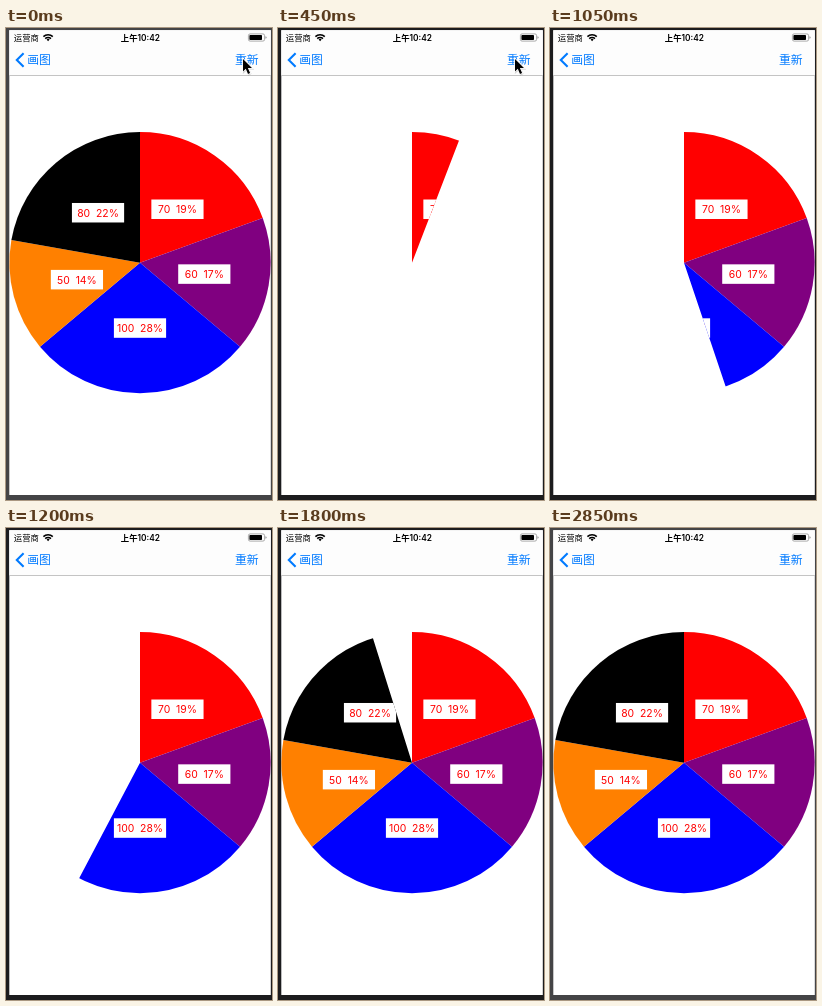
Write an HTML page that moves like this. It is 266 px wide and 472 px high and loops after 2950 ms.

```html
<!DOCTYPE html>
<html lang="zh-CN">
<head>
<meta charset="utf-8">
<title>Pie chart</title>
<style>
  html, body { margin: 0; height: 100%; overflow: hidden; background: #fff; }
  svg { display: block; width: 100vw; height: 100vh; }
  text { font-family: Inter, "Noto Sans CJK SC", "Noto Sans CJK", sans-serif; white-space: pre; }
  .status { font-size: 8.36px; }
  .clock { font-weight: 600; }
  .nav { font-size: 11.85px; fill: #007aff; }
  .label { font-size: 10.4px; fill: #f00; text-anchor: middle; }
</style>
</head>
<body>
<svg viewBox="0 0 266 472">
  <defs><clipPath id="reveal"><path id="sweep"/></clipPath></defs>
  <rect id="bezel" width="266" height="472"/>
  <rect x="3.3" y="2.2" width="261.5" height="464.8" fill="#fff"/>
  <rect x="3.3" y="2.2" width="261.5" height="44.8" fill="#fdfdfd"/>
  <rect x="3.3" y="47" width="261.5" height="1" fill="#c4c4c4"/>

  <text class="status" x="7.8" y="12.7">运营商</text>
  <g fill="none" stroke="#000" stroke-width="1.5">
    <path d="M37.4 8.6a6.6 6.6 0 0 1 9.4 0M39.2 10.6a4.1 4.1 0 0 1 5.8 0"/>
    <path d="M42.1 13.2l-1.5-1.6a2.1 2.1 0 0 1 3 0z" fill="#000" stroke="none"/>
  </g>
  <text class="status clock" x="114.8" y="12.7">上午10:42</text>
  <rect x="242.4" y="5.9" width="16.2" height="7.2" rx="1.7" fill="none" stroke="#888" stroke-width=".7"/>
  <rect x="243.4" y="6.9" width="12.6" height="5.2" rx=".8"/>
  <path d="M259.5 8.2q1.1 .3 1.1 1.3t-1.1 1.3z" fill="#888"/>

  <path d="M17.6 25.2l-6.8 6.8 6.8 6.8" fill="none" stroke="#007aff" stroke-width="2.1"/>
  <text class="nav" x="21.2" y="36.4">画图</text>
  <text class="nav" id="redo" x="229" y="36.4">重新</text>

  <g id="pie" clip-path="url(#reveal)"></g>

  <g id="cursor">
    <path d="M237.6 32.2v12l2.8-2.7 2.1 5 2-.8-2.1-5h4z" fill="#000" opacity=".2" stroke="#000" stroke-width="1.5"/>
    <path d="M237 31v12.4l2.8-2.7 2.2 5.3 2.1-.9-2.2-5.1h4.1z" stroke="#fff" stroke-width="1.7" paint-order="stroke"/>
  </g>
</svg>
<script>
const LOOP = 2950, STEP = 150, BEGIN = 110, DURATION = 2000;
const CX = 134, CY = 234.7, R = 130.6;
const slices = [[70, '#f00'], [60, '#800080'], [100, '#00f'], [50, '#ff8000'], [80, '#000']];
const $ = id => document.getElementById(id);

// Degrees run clockwise from twelve o'clock.
function polar(deg, r) {
  const a = deg * Math.PI / 180;
  return [CX + r * Math.sin(a), CY - r * Math.cos(a)];
}

function sector(from, to, r) {
  const arc = deg => `A${r} ${r} 0 0 1 ${polar(deg, r)}`;
  return `M${CX} ${CY}L${polar(from, r)}${arc((from + to) / 2)}${arc(to)}Z`;
}

function add(tag, attrs, text = '') {
  const el = document.createElementNS('http://www.w3.org/2000/svg', tag);
  for (const k in attrs) el.setAttribute(k, attrs[k]);
  el.textContent = text;
  $('pie').append(el);
}

// cubic-bezier(.42, 0, .58, 1)
function easeInOut(p) {
  if (p <= 0 || p >= 1) return p <= 0 ? 0 : 1;
  let lo = 0, hi = 1, s;
  for (let i = 0; i < 30; i++) {
    s = (lo + hi) / 2;
    const x = 1.26 * s * (1 - s) ** 2 + 1.74 * s * s * (1 - s) + s ** 3;
    if (x < p) lo = s; else hi = s;
  }
  return s * s * (3 - 2 * s);
}

let start = 0;
const labels = [];
for (const [value, fill] of slices) {
  add('path', { d: sector(start, start + value, R), fill });
  labels.push([polar(start + value / 2, R / 2), `${value}  ${Math.round(value / 3.6)}%`]);
  start += value;
}
for (const [[x, y], text] of labels) {
  add('rect', { x: x - 26.1, y: y - 9.7, width: 52.2, height: 19.5, fill: '#fff' });
  add('text', { class: 'label', x, y: y + 3.9 }, text);
}

function draw() {
  const t = Math.floor(performance.now() % LOOP / STEP) * STEP;
  const angle = t < STEP ? 360 : 360 * easeInOut((t - BEGIN) / DURATION);
  $('sweep').setAttribute('d', sector(0, angle, R + 3));
  $('bezel').setAttribute('fill', t < 150 || t >= 2850 ? '#444446' : '#1c1c1e');
  $('redo').setAttribute('opacity', t === 150 ? .7 : t === 300 ? .88 : 1);
  $('cursor').setAttribute('visibility', t < 1050 ? 'visible' : 'hidden');
  requestAnimationFrame(draw);
}
draw();
</script>
</body>
</html>
```
